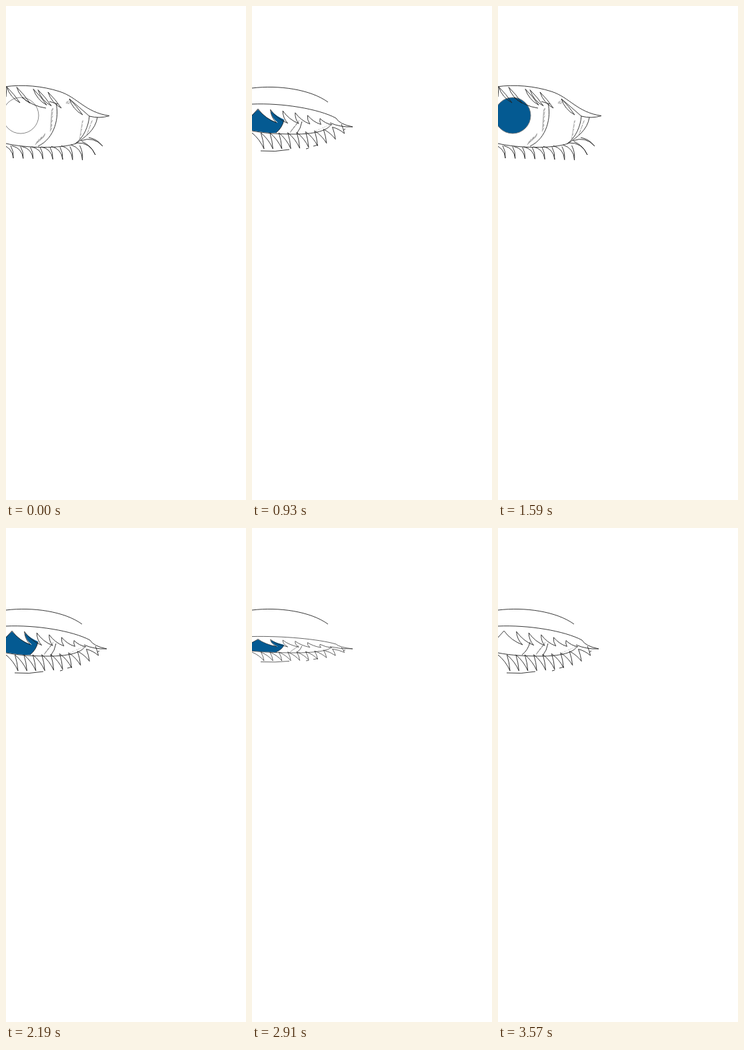
Write an HTML page that moves like this. It is 360 px wide and 740 px high and loops after 3600 ms.

```html
<!DOCTYPE html>
<html lang="en">
<head>
<meta charset="utf-8">
<title>Blinking eye</title>
<style>
html, body { margin: 0; width: 100%; height: 100%; overflow: hidden; background: #fff; }
svg { display: block; }
path, circle { fill: none; stroke: #222; stroke-width: .9; stroke-linejoin: round; }
path.hatch { stroke: #666; stroke-width: .6; }
.iris { stroke: #777; }
.blue .iris { fill: #045a92; }
#narrow .iris { stroke: none; }
</style>
</head>
<body>
<svg width="360" height="740">
  <g id="open">
    <g id="gaze">
      <circle class="iris" cx="22" cy="164" r="27"/>
      <path d="M75 146C80 165 74 198 48 210"/>
      <path class="hatch" id="irisHatch"/>
    </g>
    <path d="M-2 121C25 117 55 120 80 128C108 137 118 159 155 164.500Q140 169 125 165Q109 151 95 139"/>
    <path d="M0 136L1 121M24 137Q40 150 60 153M65 143L78 147"/>
    <path d="M0 206C30 213 82 214 105 206C119 196 134 186 137 167M125 165C124 179 117 197 104 206"/>
    <path class="hatch" id="cornerHatch"/>
    <path id="openLashes"/>
  </g>
  <g id="narrow">
    <path d="M0 123C40 118 88 125 114 144"/>
    <g id="lids">
      <path class="iris" d="M-2 165L9 155Q22 170 39 175Q29 167 28 157Q38 166 48 170Q46 182 36 190Q18 190 -2 186Z"/>
      <path d="M0 147C45 145 100 154 126 168Q131 177 151 181Q133 182 117 175"/>
      <path d="M0 187C20 191 42 192 70 192C95 191 113 187 119 177M48 171Q45 183 36 190M75 173Q73 184 67 191"/>
      <path d="M13 217Q35 219 56 215M81 214L85 213M92 210L99 208M137 186L140 184"/>
      <path class="hatch" id="narrowHatch"/>
      <path id="narrowLashes"/>
    </g>
  </g>
</svg>
<script>
const el = id => document.getElementById(id);
const draw = (id, d) => el(id).setAttribute('d', d);
const repeat = (count, make) => Array.from({ length: count }, (_, i) => make(i)).join('');

// Short slanted strokes spread between two points
const hatch = (x0, y0, x1, y1, count, length) => repeat(count, i => {
  const k = i / (count - 1), size = length * (.7 + .3 * Math.sin(i * 2.3));
  return `M${x0 + (x1 - x0) * k} ${y0 + (y1 - y0) * k}l${size * .55} ${-size}`;
});

// Curve between two points, bowed sideways by a share of its length
const bow = ([x0, y0], [x1, y1], bend) =>
  `Q${(x0 + x1) / 2 - (y1 - y0) * bend} ${(y0 + y1) / 2 + (x1 - x0) * bend} ${x1} ${y1}`;

const lash = (start, tip, end, bendOut, bendBack) =>
  `M${start}${bow(start, tip, bendOut)}${bow(tip, end, bendBack)}`;

draw('irisHatch', hatch(68, 157, 66, 188, 15, 6) + hatch(44, 208, 56, 197, 8, 8));
draw('cornerHatch', hatch(114, 174, 110, 200, 12, 4) + hatch(128, 174, 121, 193, 8, 4) +
  hatch(90, 146, 94, 147, 4, 5));
draw('narrowHatch', hatch(57, 190, 68, 176, 10, 5) + hatch(97, 187, 115, 179, 7, 1.5));

// Open eye: leaves hanging from the lid, hooks below, two big hooks at the corner
const leaves = [1, 16, 41, 48, 63, 95].map(x => {
  const y = 121 + x * x * .002, tip = [x, y];
  return lash(tip, [x + 20, y + 24], tip, .2, .05);
}).join('');
const hooks = repeat(8, i => {
  const x = 11 + 14.8 * i, base = 208 + 3 * Math.sin(i * Math.PI / 7);
  return lash([x - 17, base], [x, 228 + i * .4], [x - 4, base + 1], -.35, .15);
});
const cornerHooks = repeat(2, i =>
  lash([106 + 6 * i, 205 - 3 * i], [134 + 11 * i, 223 - 13 * i], [114 + 10 * i, 203 - 6 * i], -.35, .2));
draw('openLashes', leaves + hooks + cornerHooks);

// Narrow eye: both lash rows are zigzags that flatten towards the corner
const upperTip = i => {
  const x = 9 + 18.6 * i;
  return [x, 154 + x * x * .0014];
};
const upper = repeat(6, i => {
  const tip = upperTip(i), root = [tip[0] + 28 - 2 * i, 175 + .6 * i];
  return `${i ? '' : 'M0 164L' + tip}${bow(tip, root, .15)}` +
    (i < 5 ? bow(root, upperTip(i + 1), -.2) : '');
});
const lowerRoot = i => [13.4 * i, 190 - 13 * (i / 10) ** 4];
const lower = repeat(10, i =>
  lash(lowerRoot(i), [18 + 13.4 * i, 214 - 23 * (i / 9) ** 4], lowerRoot(i + 1), -.12, .06));
draw('narrowLashes', upper + lower);

function frame() {
  const tick = Math.floor((performance.now() % 3600 + 30) / 60);
  // One step per tick, held once in every 25 ticks
  const step = (tick - Math.floor((tick + 5) / 25)) % 15;
  const isOpen = step === 0 || step > 6 && step < 13;
  el('open').style.display = isOpen ? '' : 'none';
  el('narrow').style.display = isOpen ? 'none' : '';
  document.querySelector('svg').classList.toggle('blue', step > 0 && step < 12);

  const left = Math.max(0, 1 - Math.abs(step - 8) / 3);
  el('gaze').setAttribute('transform', `translate(${-16.5 * left} ${-2.5 * left})`);

  const closed = step > 12 ? (step - 13) * .3 : .6 * Math.sin(Math.PI * (Math.max(0, step - 1) / 5) ** .8);
  el('lids').setAttribute('transform', `translate(0 ${181 * closed}) scale(1 ${1 - closed})`);
  requestAnimationFrame(frame);
}
frame();
</script>
</body>
</html>
```
